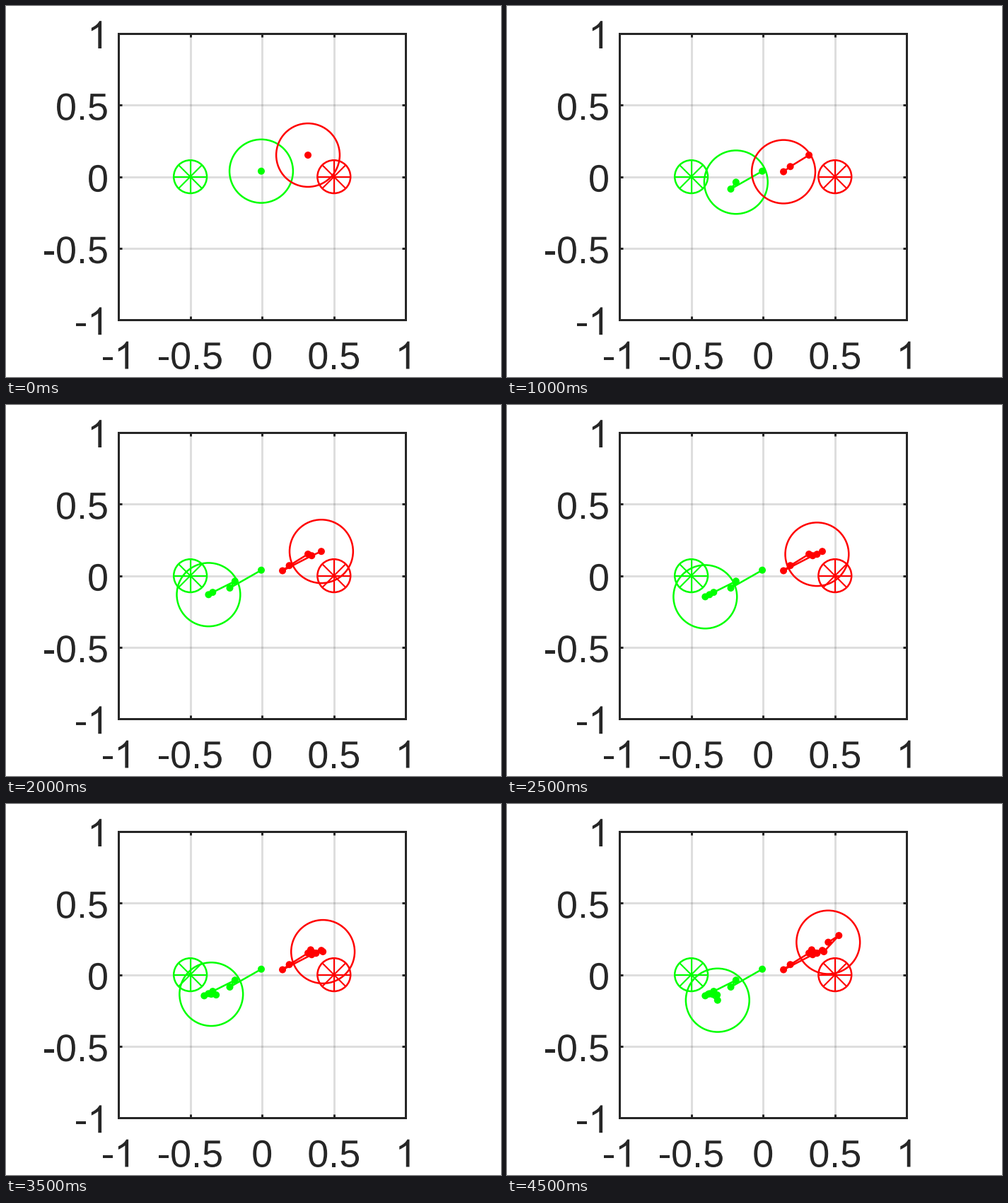
Recreate the animation shown at these times as a matplotlib script. Size 700 px wide and 525 px high, loop 6.5 s.

```python
import matplotlib.pyplot as plt
from matplotlib.animation import FuncAnimation
from matplotlib.patches import Circle, PathPatch, Rectangle
from matplotlib.path import Path
from matplotlib.textpath import TextPath
from matplotlib.transforms import Affine2D
import numpy as np

W, H, DPI = 700, 525, 100
PX = 72 / DPI                       # points per pixel
INK, GREEN, RED = "#262626", "#00ff00", "#ff0000"
LEFT, RIGHT, TOP, BOTTOM = 159, 565.4, 39, 444.2
FONT = 54
TICKS = np.linspace(-1, 1, 5)
HOLD = 3                            # extra ticks on the last state

# Key points of each walk, in axis units
WALKS = {
    GREEN: [(-.006, .039), (-.225, -.086), (-.189, -.038), (-.344, -.116),
            (-.373, -.132), (-.403, -.147), (-.320, -.141), (-.354, -.136),
            (-.381, -.135), (-.317, -.178)],
    RED: [(.319, .151), (.189, .071), (.142, .035), (.345, .140),
          (.412, .170), (.375, .150), (.338, .174), (.423, .161),
          (.527, .274), (.453, .227)],
}
STEPS = len(WALKS[RED])

# A footless digit one, in em / 2048
ONE = Path([(763, 0), (583, 0), (583, 1147), (430, 1020), (223, 930),
            (223, 1104), (540, 1250), (647, 1472), (763, 1472), (763, 0)],
           [1, 2, 2, 3, 3, 2, 3, 3, 2, 79])

fig = plt.figure(figsize=(W / DPI, H / DPI), dpi=DPI, facecolor="white")
ax = fig.add_axes([0, 0, 1, 1])
ax.set_xlim(0, W)
ax.set_ylim(H, 0)
ax.axis("off")


def to_px(x, y):
    return (LEFT + (x + 1) / 2 * (RIGHT - LEFT),
            BOTTOM - (y + 1) / 2 * (BOTTOM - TOP))


def stroke(xs, ys, color, width, **kw):
    return ax.plot(xs, ys, color=color, lw=width * PX,
                   solid_capstyle="butt", **kw)[0]


def ring(center, radius, color, z):
    return ax.add_patch(Circle(center, radius, fill=False, ec=color,
                               lw=2.5 * PX, zorder=z))


def glyph(char):
    """Outline and advance of one character."""
    if char == "1":
        return Affine2D().scale(FONT / 2048).transform_path(ONE), 0.556 * FONT
    outline = TextPath((0, 0), char, size=FONT,
                       prop={"family": "Liberation Sans"})
    return outline, {"-": 0.333, ".": 0.278}.get(char, 0.556) * FONT


def label(text, x, baseline, align):
    glyphs = [glyph(c) for c in text]
    x -= align * sum(advance for _, advance in glyphs)
    for outline, advance in glyphs:
        place = Affine2D().scale(1, -1).translate(x, baseline)
        ax.add_patch(PathPatch(place.transform_path(outline), fc=INK, lw=0))
        x += advance


def draw_axes(tick=5):
    for v in TICKS:
        x, y = to_px(v, v)
        label(f"{v:g}", x, 513.5, 0.5)
        label(f"{v:g}", 145, y + 21, 1)
        if abs(v) == 1:
            continue
        stroke([x, x], [TOP, BOTTOM], INK, 3, alpha=0.15, zorder=1)
        stroke([LEFT, RIGHT], [y, y], INK, 3, alpha=0.15, zorder=1)
        for near, far, d in ((TOP, LEFT, tick), (BOTTOM, RIGHT, -tick)):
            stroke([x, x], [near, near + d], INK, 3, zorder=2)
            stroke([far, far + d], [y, y], INK, 3, zorder=2)
    ax.add_patch(Rectangle((LEFT, TOP), RIGHT - LEFT, BOTTOM - TOP,
                           fill=False, ec=INK, lw=3 * PX, zorder=2))


def draw_wheel(center, color, r=23.4):
    x, y = center
    ring(center, r, color, 3)
    for a in np.arange(4) * np.pi / 4:
        dx, dy = r * np.cos(a), r * np.sin(a)
        stroke([x - dx, x + dx], [y - dy, y + dy], color, 2.1, zorder=3)


class Walker:
    def __init__(self, color, walk):
        self.points = np.array([to_px(*p) for p in walk])
        self.trail = stroke([], [], color, 2.5, solid_joinstyle="round",
                            zorder=4)
        self.disc = ring(self.points[0], 44.9, color, 4)
        self.dots = [ax.add_patch(Circle(p, 5, fc=color, lw=0, zorder=5))
                     for p in self.points]

    def show(self, n):
        self.trail.set_data(*self.points[:n + 1].T)
        self.disc.center = self.points[n]
        for k, dot in enumerate(self.dots):
            dot.set_visible(k <= n)
        return [self.trail, self.disc, *self.dots]


draw_axes()
draw_wheel(to_px(-0.5, 0), GREEN)
draw_wheel(to_px(0.5, 0), RED)
walkers = [Walker(color, walk) for color, walk in WALKS.items()]


def update(i):
    n = min(i, STEPS - 1)
    return [artist for w in walkers for artist in w.show(n)]


anim = FuncAnimation(fig, update, frames=STEPS + HOLD, interval=500,
                     repeat=True, repeat_delay=0, blit=False)
plt.show()
```
